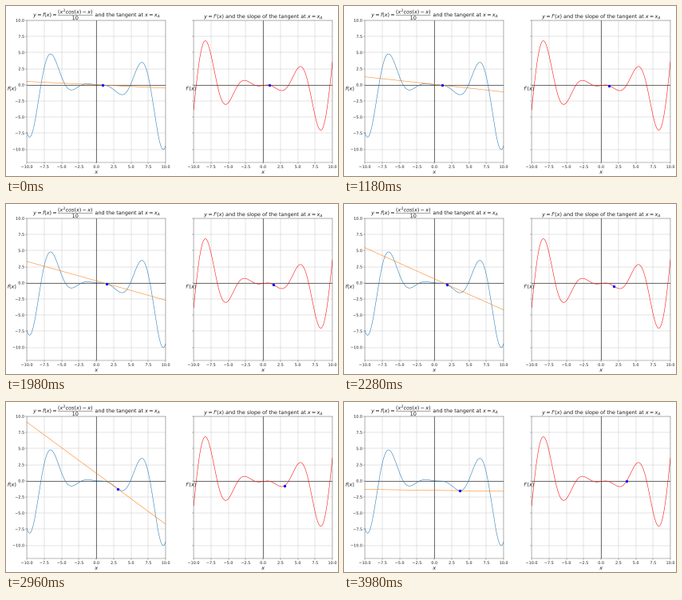
A matplotlib script that plays this animation: 416 by 213 pixels, repeating every 4000 ms.

```python
import numpy as np
import matplotlib.pyplot as plt
from matplotlib.animation import FuncAnimation
from matplotlib.patches import PathPatch
from matplotlib.textpath import TextPath
from matplotlib.transforms import Affine2D

W, H, DPI = 416, 213, 64
FRAMES, INTERVAL = 200, 20
START, RATE = 0.9, 0.05
TOP, BOTTOM, WIDTH = 18, 195.7, 174
TICKS = np.arange(-10, 10.1, 2.5)


def pt(px):
    return px * 72 / DPI


plt.rcParams.update({
    "font.family": "DejaVu Sans",
    "axes.linewidth": pt(0.27),
    "grid.linewidth": pt(0.33),
    "grid.color": "#b0b0b0",
    "lines.linewidth": pt(0.53),
})


def f(x):
    return (x**2 * np.cos(x) - x) / 10


def df(x):
    return (2 * x * np.cos(x) - x**2 * np.sin(x) - 1) / 10


def descend(x, steps):
    path = [x]
    for _ in range(steps - 1):
        x -= RATE * df(x)
        path.append(x)
    return path


fig = plt.figure(figsize=(W / DPI, H / DPI), dpi=DPI, facecolor="white")
xs = np.linspace(-10, 10, 500)
ends = np.array([-10.0, 10.0])
path = descend(START, FRAMES)


def label(x, y, text, size=6.45, align=0.5):
    """Outlined text on the baseline y; align 0.5 centres, 1 ends at x."""
    shape = TextPath((0, 0), text, size=size)
    box = shape.get_extents()
    place = Affine2D().translate(x - box.x0 - align * box.width, H - y)
    place.scale(1 / W, 1 / H)
    fig.add_artist(PathPatch(shape, transform=place + fig.transFigure,
                             fc="0.1", lw=0, snap=False))


def number(v):
    return f"{v:.1f}".replace("-", "\u2212")


def panel(left, func, color, title, title_y):
    mid = left + WIDTH / 2
    ax = fig.add_axes([left / W, 1 - BOTTOM / H,
                       WIDTH / W, (BOTTOM - TOP) / H])
    ax.set(xlim=(-10, 10), ylim=(-12, 10), xticks=TICKS, yticks=TICKS)
    ax.tick_params(length=pt(1.7), width=pt(0.25),
                   labelleft=False, labelbottom=False)
    ax.grid(True)
    ax.axhline(0, color="black")
    ax.axvline(0, color="black")
    ax.plot(xs, func(xs), color=color)
    for v in TICKS:
        label(mid + v * WIDTH / 20, 203.1, number(v), size=4.9)
    label(mid, title_y, title)
    label(mid, 210, "$x$")
    return ax


def dot(ax):
    return ax.plot([], [], "o", color="blue", ms=pt(2.9),
                   mew=pt(0.45), zorder=5, snap=False)[0]


ax_f = panel(26.2, f, "C0",
             r"$y=f(x)=\dfrac{(x^2cos(x)-x)}{10}$ and the tangent at $x=x_A$",
             13.2)
ax_d = panel(235.1, df, "red",
             r"$y=f'(x)$ and the slope of the tangent at $x=x_A$", 15.2)
for v in TICKS:
    label(22.7, TOP + (10 - v) * (BOTTOM - TOP) / 22 + 1.8,
          number(v), size=4.9, align=1)
label(7.3, 105.6, "$f(x)$")
label(231.7, 105.6, "$f'(x)$")

tangent, = ax_f.plot([], [], color="C1")
dot_f, dot_d = dot(ax_f), dot(ax_d)


def update(i):
    x = path[i]
    tangent.set_data(ends, f(x) + df(x) * (ends - x))
    dot_f.set_data([x], [f(x)])
    dot_d.set_data([x], [df(x)])
    return tangent, dot_f, dot_d


anim = FuncAnimation(fig, update, frames=FRAMES, interval=INTERVAL,
                     repeat=True, repeat_delay=0)
plt.show()
```
